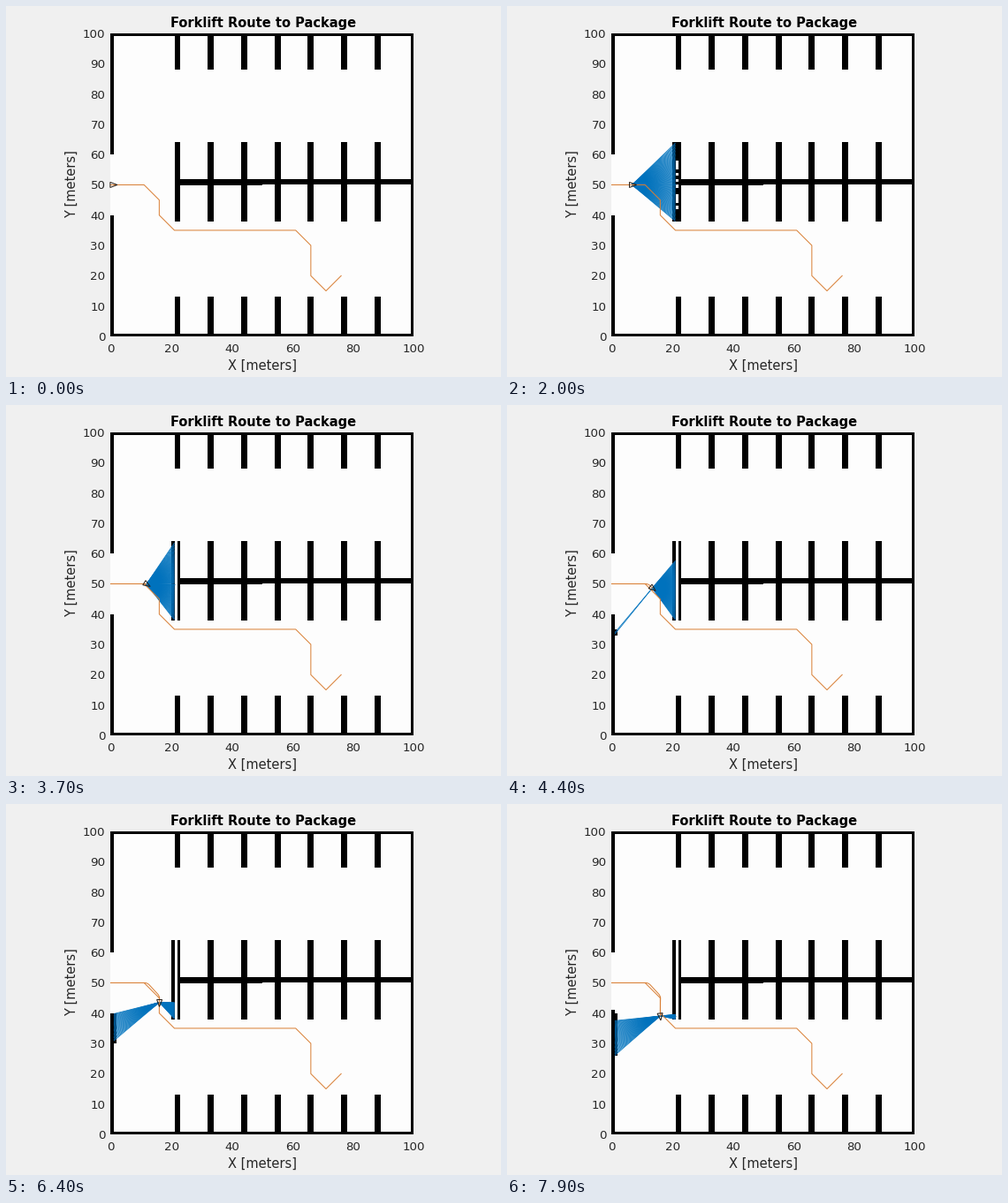
A matplotlib script that plays this animation: 560x420 px, repeating every 8 s.

```python
import numpy as np
import matplotlib.pyplot as plt
from matplotlib.animation import FuncAnimation
from matplotlib.collections import LineCollection
from matplotlib.colors import ListedColormap
from matplotlib.patches import Polygon, Rectangle

W, H, DPI = 560, 420, 100
PX = 72 / DPI
FRAMES, STEP_MS = 80, 100
LIDAR_RANGE = 20
BLUE, ORANGE = "#0072bd", "#d97f35"

# The 100 x 100 m plot area in stage pixels
LEFT, RIGHT, TOP, BOTTOM = 118.48, 461.48, 31, 373.95


def sx(x):
    return LEFT + np.asarray(x) * (RIGHT - LEFT) / 100


def sy(y):
    return BOTTOM - np.asarray(y) * (BOTTOM - TOP) / 100


def to_stage(points):
    p = np.asarray(points, float)
    return np.column_stack([sx(p[:, 0]), sy(p[:, 1])])


ROUTE = [(0, 50), (11, 50), (16, 45), (16, 40), (21, 35), (61, 35),
         (66, 30), (66, 20), (71, 15), (76, 20)]

# Path really driven, with its arc length and heading
DRIVEN = np.array([(0, 50), (11.4, 50), (12.0, 49.85), (12.6, 49.45),
                   (15.6, 46.2), (15.95, 45.6), (16.1, 45), (16.05, 43),
                   (16, 38)])
ARC = np.append(0, np.cumsum(np.hypot(*np.diff(DRIVEN, axis=0).T)))
TURNS = np.array([(0, 0), (10.9, 0), (11.8, -32), (13, -38), (16, -45),
                  (17.6, -65), (19.3, -91), (23.4, -90), (24.4, -84)])


def pose(n):
    s = 0.7 + 0.3 * n
    x = np.interp(s, ARC, DRIVEN[:, 0])
    y = np.interp(s, ARC, DRIVEN[:, 1])
    return s, x, y, np.radians(np.interp(s, TURNS[:, 0], TURNS[:, 1]))


def scan(n):
    """Lidar hits on the first rack and on the left wall."""
    _, x, y, heading = pose(n)
    hits = []
    if n == 0:
        return hits
    for a in heading + np.radians(np.arange(-90, 91)):
        dx, dy = np.cos(a), np.sin(a)
        if abs(dx) < 1e-6:
            continue
        wall, low, high = (21, 38, 64) if dx > 0 else (1, 0, 40)
        dist = (wall - x) / dx
        hy = y + dist * dy
        if 0 < dist <= LIDAR_RANGE and low <= hy < high:
            hits.append((wall, hy))
    return hits


def build_map():
    grid = np.zeros((100, 100), int)
    grid[[0, 99], :] = 1
    grid[:, 99] = 1
    grid[:40, 0] = grid[60:, 0] = 1
    for c in range(21, 88, 11):
        for low, high in ((0, 13), (38, 64), (88, 100)):
            grid[low:high, c:c + 2] = 1
    grid[50:52, 22:] = 1
    return grid


BASE = build_map()
SCANS = [scan(n) for n in range(FRAMES)]

# First time each cell beside a surface is seen
rack_seen = np.full(100, FRAMES)
wall_seen = np.full(100, FRAMES)
for n, hits in enumerate(SCANS):
    for wall, hy in hits:
        seen = rack_seen if wall == 21 else wall_seen
        row = int(hy)
        seen[row] = min(seen[row], n)

rng = np.random.default_rng(4)
cleared = np.where(rack_seen < FRAMES,
                   np.minimum(rack_seen + rng.uniform(6, 26, 100), 35), FRAMES)

# Map cell under each pixel centre of the plot area
X0, X1, Y0, Y1 = 118, 461, 31, 374
pixel_x, pixel_y = np.arange(X0, X1) + 0.5, np.arange(Y0, Y1) + 0.5
COLS = np.clip((pixel_x - LEFT) / (RIGHT - LEFT) * 100, 0, 99).astype(int)
ROWS = np.clip((BOTTOM - pixel_y) / (BOTTOM - TOP) * 100, 0, 99).astype(int)


def map_at(n):
    grid = BASE.copy()
    grid[rack_seen <= n, 20] = 1
    grid[cleared <= n, 21] = 0
    grid[wall_seen <= n, 1] = 1
    if n > 70:
        grid[40, 0] = 1
    return grid[np.ix_(ROWS, COLS)]


fig = plt.figure(figsize=(W / DPI, H / DPI), dpi=DPI, facecolor="#f0f0f0")
ax = fig.add_axes([0, 0, 1, 1])
ax.set_axis_off()

floor = ax.imshow(map_at(0), cmap=ListedColormap(["#fdfdfd", "black"]),
                  vmin=0, vmax=1, interpolation="nearest",
                  extent=(X0, X1, Y1, Y0), aspect="auto")
ax.set_xlim(0, W)
ax.set_ylim(H, 0)
ax.add_patch(Rectangle((194, 202), 96, 1, fc="black", lw=0, antialiased=False))

rays = LineCollection([], colors=BLUE, linewidths=0.8 * PX, zorder=2)
ax.add_collection(rays)
ax.plot(*to_stage(ROUTE).T, color=ORANGE, lw=1 * PX, zorder=3)
trail, = ax.plot([], [], color=ORANGE, lw=1 * PX, zorder=4)
truck = Polygon(np.zeros((3, 2)), closed=True, fill=False, ec="#2a2018",
                lw=1 * PX, zorder=5)
ax.add_patch(truck)


def label(x, y, text, size=13.33, color="#262626", ha="center", **kw):
    ax.text(x, y, text, fontsize=size * PX, color=color, ha=ha,
            va="baseline", family="DejaVu Sans", **kw)


for v in range(0, 101, 10):
    label(112.5, sy(v) + 5, str(v), ha="right")
for v in range(0, 101, 20):
    label(sx(v), 392, str(v))
label(291, 24, "Forklift Route to Package", 14.67, "black", weight="bold")
label(290, 412, "X [meters]", 14.67)
label(79, 202, "Y [meters]", 14.67, rotation=90, rotation_mode="anchor")


def draw(n):
    s, x, y, heading = pose(n)
    floor.set_data(map_at(n))
    rays.set_segments([to_stage([(x, y), hit]) for hit in SCANS[n]])
    trail.set_data(*to_stage(np.vstack([DRIVEN[ARC < s], (x, y)])).T)

    along, across = np.array([(-3, -3), (5, 0), (-3, 3)]).T
    c, d = np.cos(heading), -np.sin(heading)
    truck.set_xy(np.column_stack([sx(x) + along * c - across * d,
                                  sy(y) + along * d + across * c]))
    return floor, rays, trail, truck


anim = FuncAnimation(fig, draw, frames=FRAMES, interval=STEP_MS,
                     repeat=True, repeat_delay=0, blit=False)
plt.show()
```
